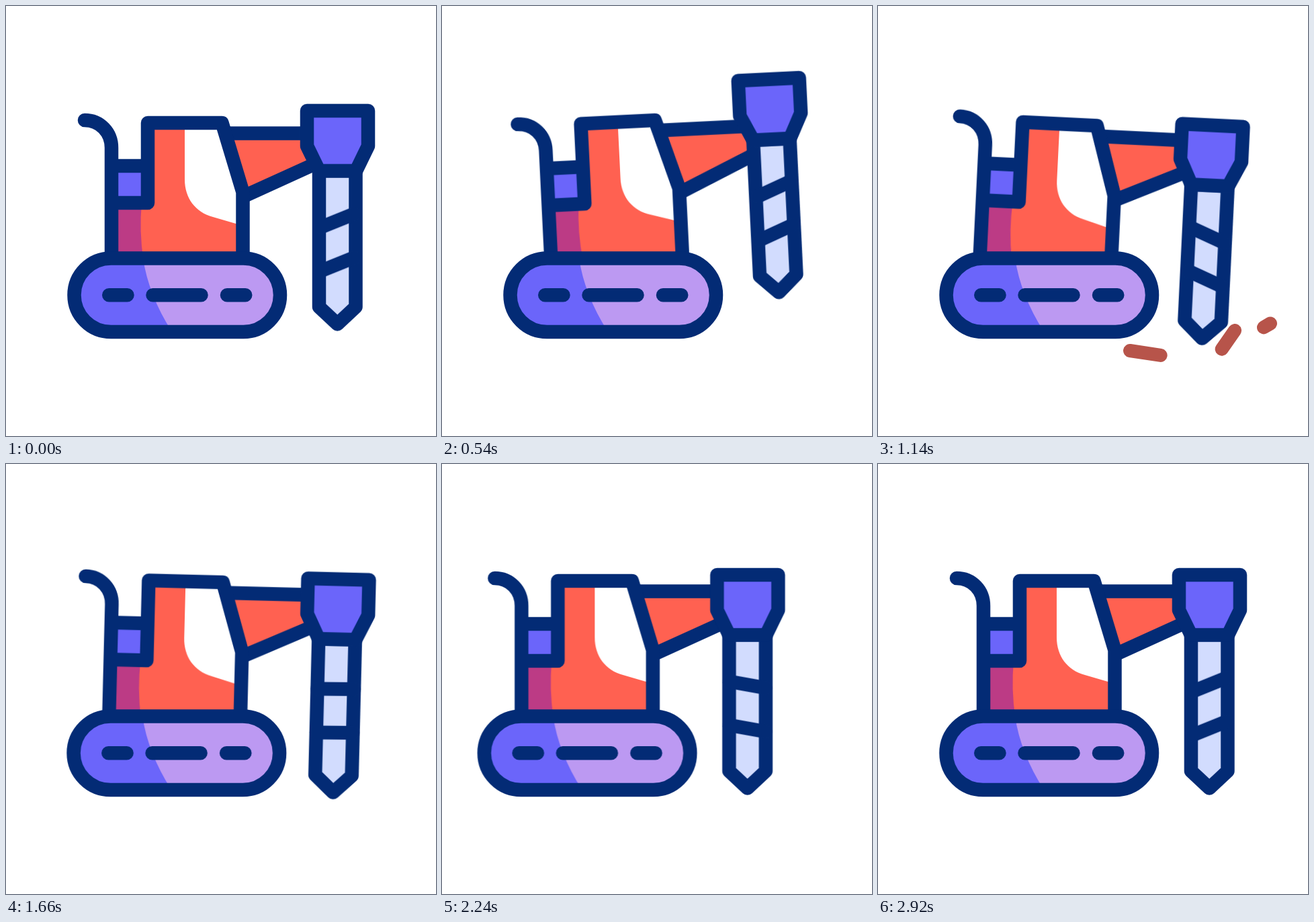
Animation of 640 by 640 pixels, one loop 3.6 s. Source, as an HTML page without scripts:

```html
<!DOCTYPE html>
<html lang="en">
<head>
<meta charset="utf-8">
<title>Drilling machine</title>
<style>
  html, body { margin: 0; width: 100%; height: 100%; overflow: hidden; background: #fff; }
  svg { display: block; width: 100%; height: 100%; }

  .line { fill: none; stroke: #032b75; stroke-width: 20.5; stroke-linecap: round; stroke-linejoin: round; }
  .red { fill: #ff6151; }
  .magenta { fill: #bc3b85; }
  .purple { fill: #6b65fa; }
  .lilac { fill: #bc99f2; }
  .pale { fill: #d2dcfe; }
  .white { fill: #fff; }

  .machine, .body, .drill, .stripe, .chips path {
    animation: 3.6s cubic-bezier(.33, 0, .67, 1) infinite;
  }
  .machine { animation-name: drive; }
  .body { animation-name: rock; transform-origin: 238px 265px; }
  .drill { animation-name: lift; }
  .stripe { animation-name: spin; }
  .chips path {
    animation-name: fly;
    fill: none; stroke: #b7544a; stroke-width: 20; stroke-linecap: round;
  }

  @keyframes drive {
    0%, 44.44% { transform: translateX(0); }
    63.33% { transform: translateX(-39px); }
    81.67%, 100% { transform: translateX(0); }
  }
  @keyframes rock {
    0% { transform: rotate(0deg); }
    14.8%, 15.5% { transform: rotate(-2.8deg); }
    30%, 37.04% { transform: rotate(2.8deg); }
    55.56%, 100% { transform: rotate(0deg); }
  }
  @keyframes lift {
    0% { transform: translateY(-9px); animation-timing-function: cubic-bezier(.3, .3, .67, 1); }
    12.22% { transform: translateY(-47px); }
    29.44%, 100% { transform: translateY(0); }
  }
  @keyframes spin {
    0%, 15% { transform: rotate(-22deg); }
    30.56%, 32.22% { transform: rotate(22deg); }
    36.94% { transform: rotate(-22deg); }
    55.83% { transform: rotate(22deg); }
    74.72%, 100% { transform: rotate(-22deg); }
  }
  /* each chip grows outward, then its tail catches up */
  @keyframes fly {
    0%, 24.43% { stroke-dasharray: 0 3; stroke-dashoffset: 0; opacity: 0; }
    24.44% { stroke-dasharray: 0 3; stroke-dashoffset: 0; opacity: 1; }
    29.44% { stroke-dasharray: 1 3; stroke-dashoffset: 0; opacity: 1; }
    35.55% { stroke-dasharray: 0 3; stroke-dashoffset: -1; opacity: 1; }
    35.56%, 100% { stroke-dasharray: 0 3; stroke-dashoffset: -1; opacity: 0; }
  }
</style>
</head>
<body>
<svg viewBox="0 0 640 640">
  <g class="chips">
    <path pathLength="1" d="M441 523L375 513"/>
    <path pathLength="1" d="M503 523L531 483"/>
    <path pathLength="1" d="M569.5 481L584 472.5"/>
  </g>

  <g class="machine">
    <g class="body">
      <!-- arm -->
      <path class="red" d="M327 189H462V235L352.500 284Z"/>
      <path class="line" d="M327 189.500H460M352.500 283.800L460 235"/>

      <!-- cab -->
      <path class="red" d="M211 174H321.500L352.500 277V378H157V293H211Z"/>
      <path class="magenta" d="M157 293H202Q198 335 204.500 378H157Z"/>
      <path class="white" d="M266 174V258C266 286 282 307 308 314L352.500 327V277L321.500 174Z"/>
      <path class="purple" d="M157 238H211V293H157Z"/>
      <path class="line" d="M117 170C140 170 157 188 157 211V376M157 238H211M157 293H211V174H321.500L352.500 277V376"/>

      <!-- drill -->
      <g class="drill">
        <path class="line" style="fill:#d2dcfe" d="M466 254V457L493.250 482.500L520.500 457V254Z"/>
        <g transform="translate(493.250 328.500)"><path class="line stripe" d="M-27 0H27"/></g>
        <g transform="translate(493.250 393.500)"><path class="line stripe" d="M-27 0H27"/></g>
        <path class="line" style="fill:#6b65fa" d="M448 165H539V217.500L521 254.500H466L448 217.500Z"/>
      </g>
    </g>

    <!-- track -->
    <rect class="purple" x="101.500" y="375.500" width="306.500" height="109.500" rx="54.750"/>
    <path class="lilac" d="M204 375.500Q212 430 247 485H353.250A54.750 54.750 0 0 0 353.250 375.500Z"/>
    <rect class="line" x="101.500" y="375.500" width="306.500" height="109.500" rx="54.750"/>
    <path class="line" d="M153.250 430.300H180.500M218.500 430.300H290.500M329 430.300H356.250"/>
  </g>
</svg>
</body>
</html>
```
